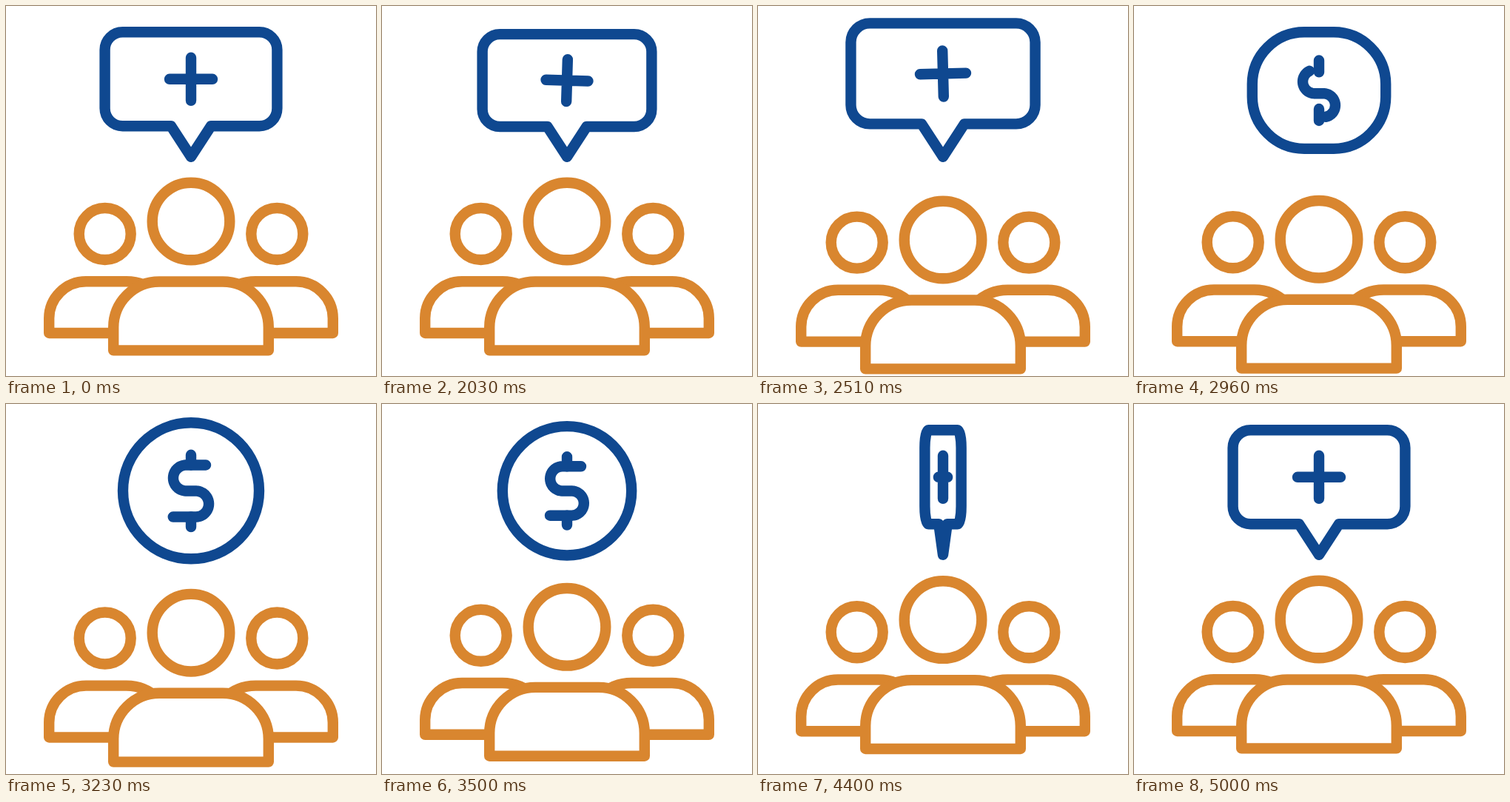
An HTML page for the animation above (5030 ms loop, 500 by 500 pixels).

```html
<!DOCTYPE html>
<html lang="en">
<head>
<meta charset="utf-8">
<title>People and value</title>
<style>
  html, body { margin: 0; width: 100%; height: 100%; overflow: hidden; background: #fff; }
  svg { display: block; width: 100vw; height: 100vh; }
  path, circle { fill: none; stroke-width: 14.4; stroke-linecap: round; stroke-linejoin: round; }
  .people { stroke: #d9862f; }
  .idea { stroke: #0f4890; }
  .idea path { vector-effect: non-scaling-stroke; }
  #body { fill: #fff; }
</style>
</head>
<body>
<svg viewBox="0 0 500 500">
  <defs>
    <g id="neighbour">
      <circle cx="133.7" cy="308" r="35"/>
      <path d="M145 442H58.2V422A50 50 0 0 1 108.2 372.2H162A62 62 0 0 1 206 390"/>
    </g>
  </defs>
  <g class="people">
    <g id="sides">
      <use href="#neighbour"/>
      <use href="#neighbour" transform="translate(500) scale(-1 1)"/>
    </g>
    <g id="leader">
      <circle cx="250" cy="291" r="52.3"/>
      <path id="body" d="M145.2 465.4V434.5A62 62 0 0 1 207.2 372.5H292.8A62 62 0 0 1 354.8 434.5V465.4Z"/>
    </g>
  </g>
  <g class="idea" id="idea">
    <path id="frame"/>
    <path id="plus"/>
    <path id="stems"/>
    <path id="curl"/>
  </g>
</svg>
<script>
const LOOP = 5030, HOLD = 2000;
const FLIP_START = 1.83, FLIP_END = 2.83;
const TIP = 203.7, COIN_Y = 117.3;
const el = id => document.getElementById(id);
const mix = (a, b, u) => a + (b - a) * u;
const smooth = (t, from, to) => {
  const u = Math.min(1, Math.max(0, (t - from) / (to - from)));
  return u * u * (3 - 2 * u);
};

// Eased value along [time, value] keys.
function track(keys, t) {
  let value = keys[0][1];
  for (let i = 1; i < keys.length; i++) {
    const [t0, v0] = keys[i - 1], [t1, v1] = keys[i];
    if (t >= t0) value = mix(v0, v1, smooth(t, t0, t1));
  }
  return value;
}

// CSS-style cubic-bezier(a, 0, b, 1).
function bezierEase(u, a, b) {
  if (u <= 0) return 0;
  if (u >= 1) return 1;
  let lo = 0, hi = 1;
  for (let i = 0; i < 24; i++) {
    const s = (lo + hi) / 2, r = 1 - s;
    if (3 * a * s * r * r + 3 * b * s * s * r + s * s * s < u) lo = s; else hi = s;
  }
  return lo * lo * (3 - 2 * lo);
}

const SCALE = [[0, 1], [0.2, 0.73], [0.5, 1.07], [0.6, 1.07], [0.87, 0.945],
  [1.23, 1.055], [1.5, 1], [1.77, 1.055], [2.05, 1]];

// Speech bubble at u = 0, round coin at u = 1.
function framePath(u, tail) {
  const w = mix(116.4, 87.2, u), top = mix(35.2, 30.1, u), bottom = mix(162.3, 204.5, u);
  const r = mix(24, 87.2, u), h = r * 0.4477;
  const L = 250 - w, R = 250 + w, base = 27 * (1 - u);
  return `M${L + r} ${top}H${R - r}C${R - h} ${top} ${R} ${top + h} ${R} ${top + r}` +
    `V${bottom - r}C${R} ${bottom - h} ${R - h} ${bottom} ${R - r} ${bottom}` +
    `H${250 + base}L250 ${mix(bottom, Math.max(TIP, bottom), tail)}L${250 - base} ${bottom}` +
    `H${L + r}C${L + h} ${bottom} ${L} ${bottom - h} ${L} ${bottom - r}` +
    `V${top + r}C${L} ${top + h} ${L + h} ${top} ${L + r} ${top}Z`;
}

const curlGuide = document.createElementNS("http://www.w3.org/2000/svg", "path");
curlGuide.setAttribute("d", "M269 84.3H243.8a16.6 16.6 0 0 0 0 33.2H256.2a16.6 16.6 0 0 1 0 33.2H227");
const curlLength = curlGuide.getTotalLength();

// The S stroke, opened symmetrically from its middle.
function curlPath(shown) {
  if (shown <= 0) return "";
  const points = [];
  for (let i = 0; i <= 80; i++) {
    const p = curlGuide.getPointAtLength(curlLength * (0.5 + shown * (i / 80 - 0.5)));
    points.push(p.x.toFixed(2) + " " + p.y.toFixed(2));
  }
  return "M" + points.join("L");
}

function plusPath(y, bar, angle, withStem) {
  const c = Math.cos(angle), s = Math.sin(angle);
  const arm = (dx, dy) => `M${250 - dx} ${y - dy}L${250 + dx} ${y + dy}`;
  return (bar > 0 ? arm(bar * c, bar * s) : "") + (withStem ? arm(-29 * s, 29 * c) : "");
}

function draw(t) {
  const down = smooth(t, 0.18, 0.51) * (1 - bezierEase((t - 0.8) / 2, 0.29, 0.2));
  el("leader").setAttribute("transform", `translate(0 ${25 * down})`);
  el("sides").setAttribute("transform", `translate(0 ${11.6 * down})`);

  const turn = 1 - 2 * smooth(t, FLIP_START, FLIP_END);
  const back = turn < 0;
  const u = back ? 0 : smooth(t, 0.6, 1.12);
  const scale = back ? 1 : track(SCALE, t);
  const pivot = mix(TIP, COIN_Y, u);
  const wide = Math.max(0.001, Math.abs(turn)) * scale;
  el("idea").setAttribute("transform",
    `translate(250 ${pivot}) scale(${wide} ${scale}) translate(-250 ${-pivot})`);

  el("frame").setAttribute("d", framePath(u, back ? 1 : 1 - smooth(t, 0.6, 0.9)));

  const bar = back ? 29 : 29 * (1 - smooth(t, 0.6, 0.78));
  const angle = back ? 0 : Math.PI * smooth(t, 0, 0.54);
  el("plus").setAttribute("d", plusPath(mix(98.8, 117.5, u), bar, angle, u === 0));
  el("stems").setAttribute("d", u === 0 ? "" :
    `M250 ${mix(70, 71.3, u)}V${mix(98.8, 84.3, u)}M250 ${mix(98.8, 150.7, u)}V${mix(128, 163.6, u)}`);
  el("curl").setAttribute("d", back ? "" : curlPath(smooth(t, 0.7, 1.15)));
}

const start = performance.now();
function tick() {
  const ms = (performance.now() - start) % LOOP;
  draw(Math.max(0, ms - HOLD) / 1000);
  requestAnimationFrame(tick);
}
tick();
</script>
</body>
</html>
```
